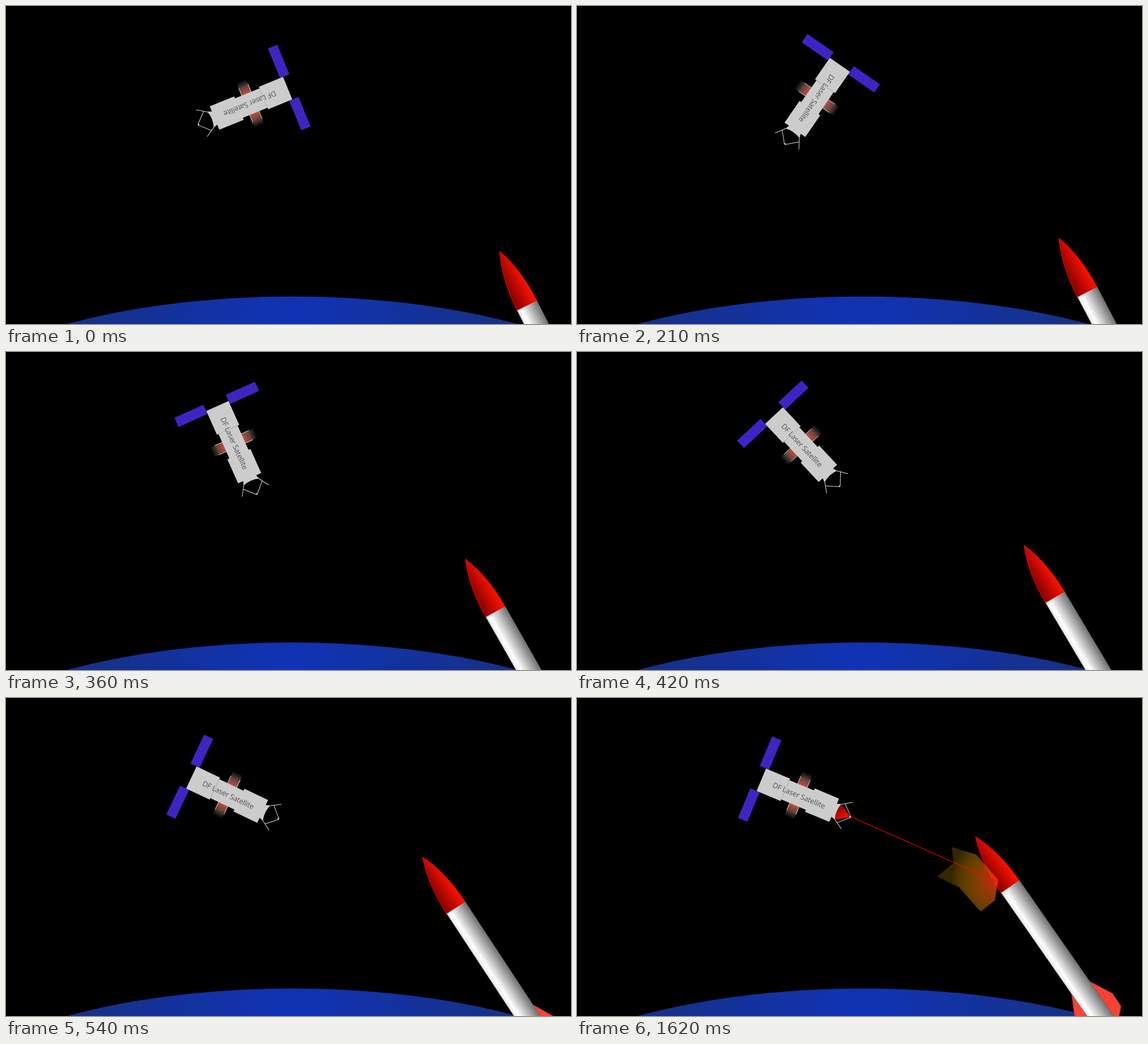
An HTML page with a canvas that plays this animation: 998 px wide and 561 px high, repeating every 1.65 s.

```html
<!DOCTYPE html>
<html lang="en">
<head>
<meta charset="utf-8">
<title>Laser satellite</title>
<style>
html, body { margin: 0; width: 100%; height: 100%; overflow: hidden; background: #000; }
canvas { display: block; }
</style>
</head>
<body>
<canvas id="stage" width="998" height="561"></canvas>
<script>
const ctx = document.getElementById('stage').getContext('2d');
const LOOP = 1650, STEP = 30, MOVE = 600, LASER_AT = 630, BLAST_AT = 660;

const mix = (a, b, p) => a + (b - a) * p;
const rad = deg => deg * Math.PI / 180;
const easeInOut = p => p < .5 ? 2 * p * p : 1 - 2 * (1 - p) ** 2;

function withStops(gradient, stops) {
  stops.forEach(([at, color]) => gradient.addColorStop(at, color));
  return gradient;
}
const linear = (x0, y0, x1, y1, ...stops) => withStops(ctx.createLinearGradient(x0, y0, x1, y1), stops);
const radial = (x, y, r, ...stops) => withStops(ctx.createRadialGradient(x, y, 0, x, y, r), stops);

function paint(path, fill, stroke, width = 1) {
  if (fill) { ctx.fillStyle = fill; ctx.fill(path); }
  if (stroke) { ctx.strokeStyle = stroke; ctx.lineWidth = width; ctx.stroke(path); }
}
const shape = (d, ...style) => paint(new Path2D(d), ...style);

function placed(x, y, deg, draw) {
  ctx.save();
  ctx.translate(x, y);
  ctx.rotate(rad(deg));
  draw();
  ctx.restore();
}

function drawEarth() {
  const path = new Path2D();
  path.ellipse(505.5, 785.5, 700, 273, 0, 0, 7);
  paint(path, radial(505, 575, 420, [0, '#1033b8'], [1, '#183080']));
}

function drawSide(side) {
  ctx.save();
  ctx.scale(1, side);
  // solar panel
  shape('M-104.6 22H-87.6V77.5H-104.6Z', '#4220dc');
  let grid = '';
  for (let i = 0; i <= 4; i++) grid += `M${-104.6 + i * 4.25} 22V77.5`;
  for (let i = 0; i <= 8; i++) grid += `M-104.6 ${22 + i * 6.94}H-87.6`;
  shape(grid, null, '#3b2c8c', .9);
  // radiator
  shape('M-31 18H-13V42H-31Z', linear(0, 18, 0, 42, [0, '#c04c3e'], [.5, '#64463f'], [1, '#060606']));
  shape('M-31 18V33M-13 18V33', null, '#ddd', .9);
  // mirror struts
  shape('M53 14L71 25.5M59.5 18.5L76 2.5', null, '#ddd');
  ctx.restore();
}

function drawSatellite(firing) {
  drawSide(1);
  drawSide(-1);
  shape('M-93 -21.5H-47V21.5H-93Z', '#ccc');
  shape('M-47 -18.5H0V-22.3H46.5V-12.5L54 -15Q49 0 54 15L46.5 12.5V22.3H0V18.5H-47Z', '#ccc');
  if (firing) shape('M54 -15Q49 0 54 15L77 0Z', linear(51, -8, 70, 6, [0, '#8a0000'], [1, '#ff1000']));
  shape('M77 -2.3V2.3', null, '#ddd', 2);
  ctx.fillStyle = '#555';
  ctx.font = '13px "Open Sans", "Noto Sans", sans-serif';
  ctx.letterSpacing = '-0.25px';
  ctx.textAlign = 'center';
  ctx.fillText('DF Laser Satellite', -21, 4.6);
}

function drawRocket() {
  const fin = 'M19.4 324L40.5 365L40 392L19.4 412Z';
  for (const side of [1, -1]) {
    ctx.save();
    ctx.scale(side, 1);
    shape(fin, '#ff4033', '#5a3a38');
    ctx.restore();
  }
  shape('M-19.4 106.5H19.4V420H-19.4Z',
    linear(-19.4, 0, 19.4, 0, [0, '#e6e6e6'], [.2, '#fff'], [1, '#707070']), '#777', .8);
  shape('M0 0Q-19 45 -19.4 106.5H19.4Q19 45 0 0Z',
    linear(-19.4, 0, 19.4, 0, [0, '#860000'], [1, '#ff1400']), '#f00');
}

function drawBlast() {
  shape('M662 263L705 276L744 321L738 357L713 377L675 334L636 315L665 291Z',
    radial(742, 322, 82, [0, 'rgba(255,50,20,.8)'], [.6, 'rgba(210,120,0,.52)'], [1, 'rgba(255,190,0,.2)']));
}

function frame() {
  const time = Math.floor(performance.now() % LOOP / STEP) * STEP;
  const p = Math.min(time / MOVE, 1);
  const climb = p * p;
  const firing = time >= LASER_AT;

  ctx.fillStyle = '#000';
  ctx.fillRect(0, 0, 998, 561);
  drawEarth();
  placed(mix(872, 704, climb), mix(433, 245, climb), -mix(26.8, 34.9, climb), drawRocket);
  if (time >= BLAST_AT) drawBlast();
  if (firing) shape('M483 209L740 323', null, '#f00', 1.2);
  placed(411.4, 180.1, mix(157.8, 22.7, easeInOut(p)), () => drawSatellite(firing));
  requestAnimationFrame(frame);
}
frame();
</script>
</body>
</html>
```
